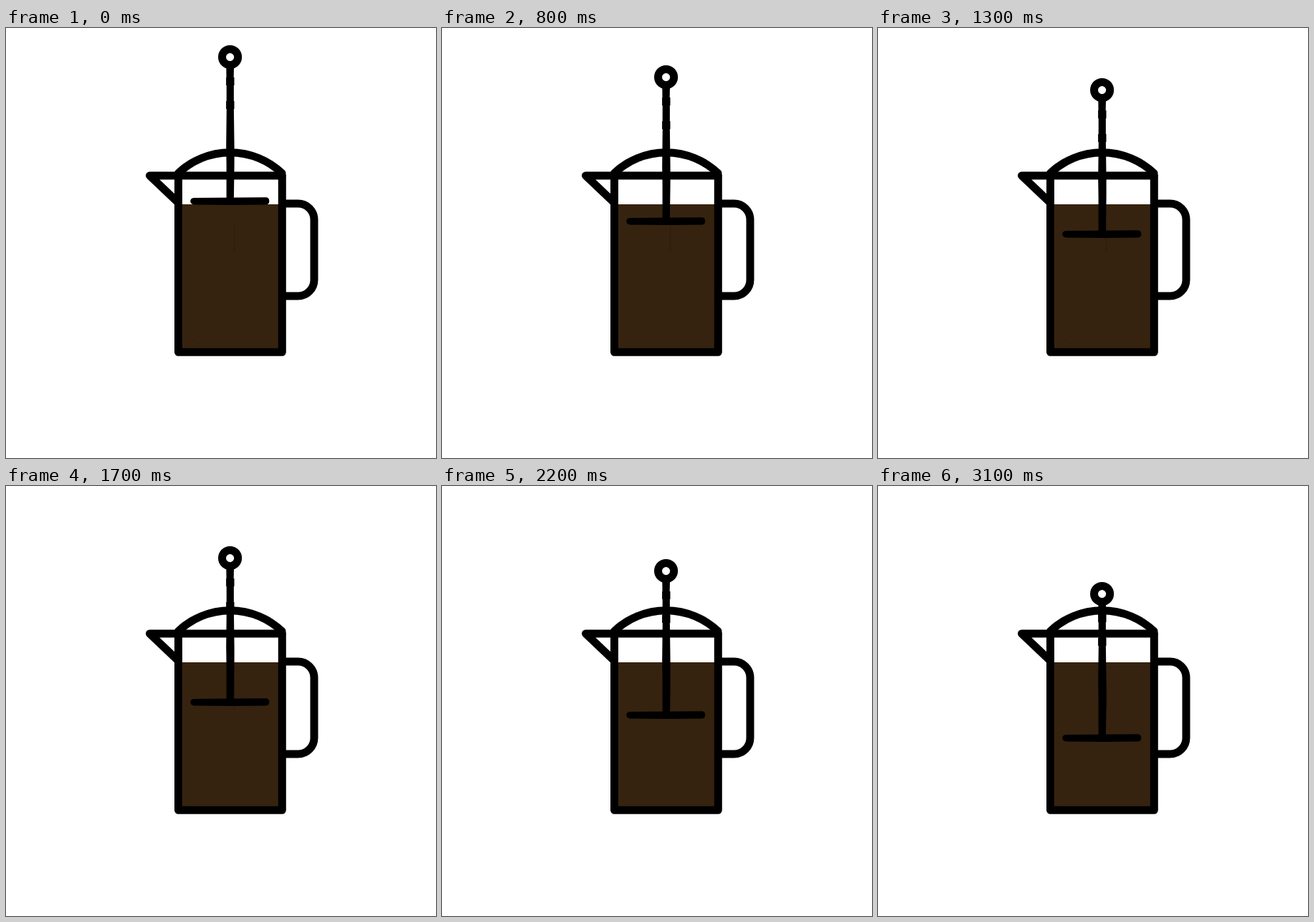
These frames come from a looping animation (600 px wide and 600 px high, 5.1 s). An HTML page:

```html
<!DOCTYPE html>
<html lang="en">
<head>
<meta charset="utf-8">
<title>Coffee press</title>
<style>
  html, body { margin: 0; width: 100%; height: 100%; overflow: hidden; background: #fff; }
  svg { display: block; width: 100vw; height: 100vh; }
  .line { fill: none; stroke: #000; stroke-width: 11; stroke-linecap: round; stroke-linejoin: round; }
</style>
</head>
<body>
<svg viewBox="0 0 600 600">
  <path fill="#36230f" d="M240 246H386V452H240Z"/>
  <path fill="none" stroke="#2c1c0b" d="M318.8 276V312M258 432L262 436"/>
  <g class="line">
    <path d="M240.5 206V452.3H385.3V206"/>
    <path d="M385 206H200.5L240 243.5"/>
    <path d="M240.5 202.5A105 105 0 0 1 385 202.5"/>
    <path d="M386 245H407.5A22.5 22.5 0 0 1 430 267.5V351.500A22.500 22.500 0 0 1 407.500 374H386"/>
  </g>
  <g id="plunger">
    <circle class="line" cx="312.6" cy="40.600" r="11.100"/>
    <path d="M307.300 52H318.100L317.700 69H318.500V80H317.900V102H318.500V113H317.900L318.600 165V190L317.900 240H307.600V190L307.200 165L307.800 113H307.100V102H307.700V80H307.100V69H307.500Z"/>
    <path d="M262 237L363 236.300Q367.300 236.500 367.300 241.500Q367.300 246.300 363 246.400L316 247L262 246.400Q257.300 245.500 257.300 241.700Q257.300 237.500 262 237Z"/>
  </g>
</svg>
<script>
  const LOOP = 5100, STEP = 100, STEPS = 31, TRAVEL = 110;
  const plunger = document.getElementById('plunger');

  // The plunger sinks in whole-pixel steps, then rests until the loop restarts.
  function draw(now) {
    const step = Math.min(STEPS, Math.floor(now % LOOP / STEP));
    const drop = Math.round(TRAVEL * step / STEPS);
    plunger.setAttribute('transform', `translate(0 ${drop})`);
    requestAnimationFrame(() => draw(performance.now() - start));
  }

  const start = performance.now();
  draw(0);
</script>
</body>
</html>
```
